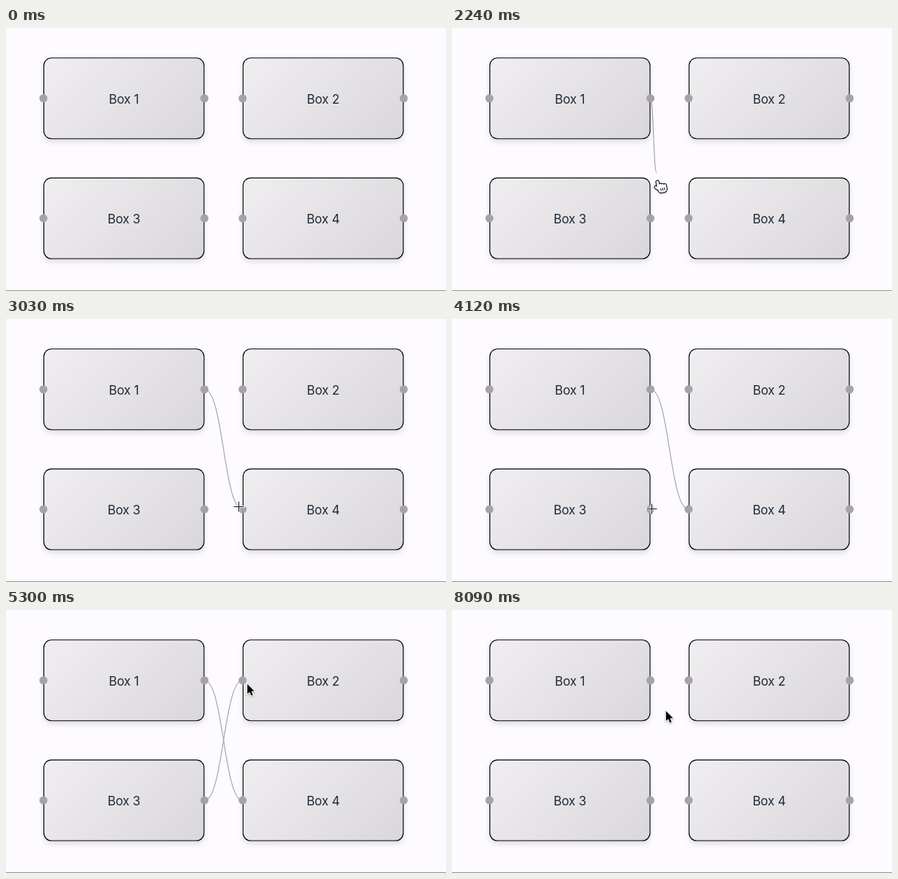
Recreate the animation shown at these times as an HTML page with a canvas. Size 600 by 358 pixels, loop 8.91 s.

```html
<!DOCTYPE html>
<html lang="en">
<head>
<meta charset="utf-8">
<title>Connecting boxes</title>
<style>
  html, body { margin: 0; width: 100%; height: 100%; overflow: hidden; background: #fdfbff; }
  canvas { display: block; width: 600px; height: 358px; }
</style>
</head>
<body>
<canvas id="stage"></canvas>
<script>
const W = 600, H = 358, LOOP = 8910, STEP = 30;
const BOX = { w: 219.6, h: 111.1, radius: 11, border: 1.15 };
const PORT = { radius: 5.5, hit: 6, snap: 22 };
const EDGE_HIT = 22;
const canvas = document.getElementById('stage');
const ctx = canvas.getContext('2d');
const dpr = window.devicePixelRatio || 1;
canvas.width = W * dpr;
canvas.height = H * dpr;

const boxes = [0, 1, 2, 3].map(i => ({
  label: `Box ${i + 1}`,
  x: 160.8 + 271.7 * (i % 2),
  y: 95.75 + 163.3 * Math.floor(i / 2)
}));
const port = (box, side) => [box.x + side * BOX.w / 2, box.y];
const ports = boxes.flatMap(box => [port(box, -1), port(box, 1)]);

const links = [
  { from: port(boxes[0], 1), to: port(boxes[3], -1), grab: 1940, drop: 3030, remove: 8060 },
  { from: port(boxes[2], 1), to: port(boxes[1], -1), grab: 4450, drop: 5240, remove: 7120 }
];

// The pointer enters from below and eases to each stop in turn.
const entry = { end: 0, x: 372, y: 362 };
const stops = [
  { start: 300, end: 480, x: 353, y: 240 },
  { start: 790, end: 1180, x: 242, y: 97.7 },
  { start: 1180, end: 1610, x: 271, y: 96 },
  { start: 1910, end: 2330, x: 281, y: 222 },
  { start: 2330, end: 3030, x: 318, y: 256 },
  { start: 3420, end: 4120, x: 272, y: 259 },
  { start: 4420, end: 5060, x: 328.3, y: 99.2 },
  { start: 5760, end: 6390, x: 306.5, y: 126 },
  { start: 7360, end: 7610, x: 291, y: 136 }
];

const smooth = u => u * u * (3 - 2 * u);
const distance = (a, b) => Math.hypot(a[0] - b[0], a[1] - b[1]);

function pointerAt(t) {
  const i = stops.findLastIndex(s => t >= s.start);
  if (i < 0) return [entry.x, entry.y];
  const from = stops[i - 1] || entry, to = stops[i];
  const elapsed = Math.floor((t - to.start) / STEP) * STEP;
  const s = smooth(Math.min(1, elapsed / (to.end - to.start)));
  return [from.x + (to.x - from.x) * s, from.y + (to.y - from.y) * s];
}

const isShown = (link, t) => t >= link.grab && t < link.remove;
const isDragged = (link, t) => t >= link.grab && t < link.drop;

// A dragged end trails the pointer by one step and snaps to a close port.
function linkEnd(link, t) {
  if (!isDragged(link, t) || distance(pointerAt(t), link.to) < PORT.snap) return link.to;
  return pointerAt(Math.max(link.grab, t - STEP));
}

function linkPath(link, t) {
  const [x, y] = link.from, [endX, endY] = linkEnd(link, t), mid = (x + endX) / 2;
  const path = new Path2D();
  path.moveTo(x, y);
  path.bezierCurveTo(mid, y, mid, endY, endX, endY);
  return path;
}

function pointerKind(t, p) {
  const inBox = b => Math.abs(p[0] - b.x) < BOX.w / 2 && Math.abs(p[1] - b.y) < BOX.h / 2;
  const shown = links.filter(l => isShown(l, t));
  if (ports.some(q => distance(p, q) < PORT.hit)) return cross;
  if (shown.some(l => isDragged(l, t))) return hand;
  if (boxes.some(inBox)) return arrow;
  ctx.lineWidth = EDGE_HIT;
  const onLink = l => ctx.isPointInStroke(linkPath(l, t), p[0] * dpr, p[1] * dpr);
  return shown.some(onLink) ? hand : arrow;
}

function shadow(color, blur, dy) {
  ctx.shadowColor = color;
  ctx.shadowBlur = blur * dpr;
  ctx.shadowOffsetY = dy * dpr;
}

const noShadow = () => shadow('transparent', 0, 0);

function fillBox(box, inset, fill) {
  const w = BOX.w - 2 * inset, h = BOX.h - 2 * inset;
  ctx.beginPath();
  ctx.roundRect(box.x - w / 2, box.y - h / 2, w, h, BOX.radius - inset);
  ctx.fillStyle = fill;
  ctx.fill();
}

function drawBox(box) {
  const { label, x, y } = box, reach = (BOX.w + BOX.h) / 4;
  const fill = ctx.createLinearGradient(x - reach, y - reach, x + reach, y + reach);
  fill.addColorStop(0, '#f0eef1');
  fill.addColorStop(1, '#d9d7da');
  shadow('rgba(0,0,0,0.1)', 6.6, 4.4);
  fillBox(box, 0, '#000');
  noShadow();
  fillBox(box, BOX.border, fill);

  ctx.fillStyle = '#1e2a38';
  ctx.font = '400 17px Inter, sans-serif';
  ctx.letterSpacing = '-0.15px';
  ctx.textAlign = 'center';
  ctx.fillText(label, x, y + 6.8);
}

function drawPort([x, y]) {
  ctx.beginPath();
  ctx.arc(x, y, PORT.radius, 0, 2 * Math.PI);
  ctx.fillStyle = '#a5a3a9';
  ctx.fill();
}

function outlined(path, line, width, fill) {
  ctx.strokeStyle = line;
  ctx.lineWidth = width;
  shadow('rgba(0,0,0,0.3)', 2.5, 1);
  ctx.stroke(path);
  noShadow();
  ctx.fillStyle = fill;
  ctx.fill(path);
}

const arrowShape = new Path2D('M0 0V14.4L3.3 11.4 5.7 16.9 8.1 15.9 5.8 10.5H10.2Z');
const crossShape = new Path2D('M-7 0H7M0-7V7');
const handShape = new Path2D();
const handLines = new Path2D();
handShape.roundRect(-1.7, 0, 3.4, 12, 1.7);
handShape.roundRect(-1, 8, 11.4, 9, 4);
handShape.ellipse(-2.4, 9.4, 3.2, 1.6, 0.8, 0, 2 * Math.PI);
for (let i = 0; i < 3; i++) {
  handShape.roundRect(1.6 + i * 2.9, 4.8 + i * 0.8, 3.2, 8, 1.6);
  handLines.moveTo(2.6 + i * 2.5, 11);
  handLines.lineTo(2.6 + i * 2.5, 14.6);
}

function arrow(x, y) {
  ctx.translate(x + 0.8, y + 1.5);
  ctx.scale(0.94, 0.94);
  outlined(arrowShape, '#fff', 2, '#000');
}

function hand(x, y) {
  ctx.translate(x, y + 0.8);
  ctx.rotate(-0.2);
  outlined(handShape, '#000', 2, '#fff');
  ctx.lineWidth = 0.9;
  ctx.stroke(handLines);
}

function cross(x, y) {
  ctx.translate(Math.floor(x) + 0.5, Math.floor(y) + 0.5);
  ctx.lineCap = 'square';
  ctx.strokeStyle = 'rgba(255,255,255,0.85)';
  ctx.lineWidth = 3;
  ctx.stroke(crossShape);
  ctx.lineCap = 'butt';
  ctx.strokeStyle = '#111';
  ctx.lineWidth = 1;
  ctx.stroke(crossShape);
}

function drawPointer(t) {
  const p = pointerAt(t);
  ctx.save();
  pointerKind(t, p)(...p);
  ctx.restore();
}

function drawLink(link, t) {
  if (!isShown(link, t)) return;
  ctx.strokeStyle = '#a2a1a6';
  ctx.lineWidth = 1.1;
  ctx.stroke(linkPath(link, t));
}

function draw(t) {
  ctx.setTransform(dpr, 0, 0, dpr, 0, 0);
  ctx.fillStyle = '#fdfbff';
  ctx.fillRect(0, 0, W, H);
  links.forEach(link => drawLink(link, t));
  boxes.forEach(drawBox);
  ports.forEach(drawPort);
  ctx.fillStyle = '#8f9391';
  ctx.fillRect(0, H - 1, W, 1);
  drawPointer(t);
}

const begin = performance.now();
function tick() {
  draw((performance.now() - begin) % LOOP);
  requestAnimationFrame(tick);
}
tick();
</script>
</body>
</html>
```
